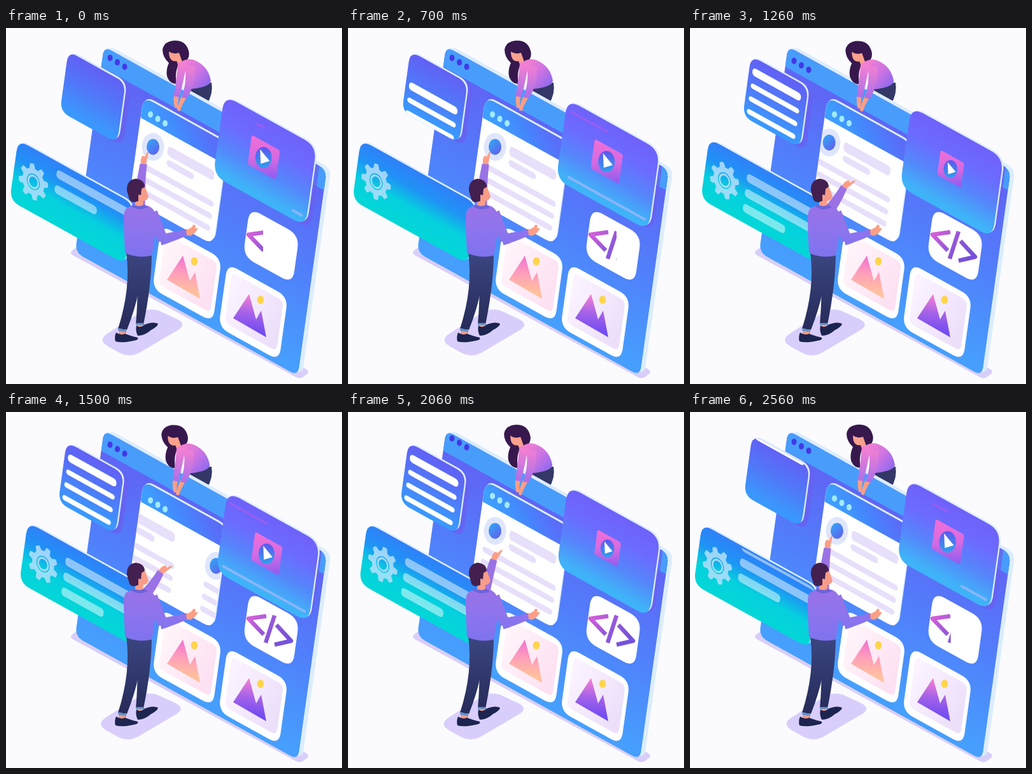
Animation, 528 px wide and 560 px high, one loop 2600 ms. Source, as an HTML page:

```html
<!DOCTYPE html>
<html lang="en">
<head>
<meta charset="utf-8">
<title>Building a web page</title>
<style>
html, body { margin: 0; width: 100%; height: 100%; overflow: hidden; background: #fbfbfe; }
svg { display: block; width: 528px; height: 560px; }
</style>
</head>
<body>
<svg id="stage" viewBox="0 0 528 560" xmlns="http://www.w3.org/2000/svg"></svg>
<script>
const LOOP = 2600, SLOPE = 0.555, LEAN = 0.14, TURN = 2 * Math.PI;
const stage = document.getElementById('stage');
const pair = (x, y) => x.toFixed(1) + ' ' + y.toFixed(1);
const mix = (a, b, k) => a + (b - a) * k;

// Closed polygon with rounded corners
function poly(pts, r) {
  const n = pts.length;
  const toward = (a, b) => {
    const k = r / Math.hypot(b[0] - a[0], b[1] - a[1]);
    return pair(mix(a[0], b[0], k), mix(a[1], b[1], k));
  };
  return pts.map((p, i) =>
    (i ? 'L' : 'M') + toward(p, pts[(i + n - 1) % n]) + 'Q' + p + ' ' + toward(p, pts[(i + 1) % n])
  ).join('') + 'Z';
}
// Rectangle lying in the slanted plane
const slab = (x, y, w, h, r) => poly([
  [x, y], [x + w, y + SLOPE * w], [x + w - LEAN * h, y + SLOPE * w + h], [x - LEAN * h, y + h]], r);

// Tapered limb from a to b, bent toward c, half widths v and w
function limb(a, c, b, v, w) {
  const dx = b[0] - a[0], dy = b[1] - a[1], d = Math.hypot(dx, dy);
  const side = (p, k) => pair(p[0] - dy / d * k, p[1] + dx / d * k);
  const m = (v + w) / 2;
  return `M${side(a, -v)}Q${side(c, -m)} ${side(b, -w)}L${side(b, w)}Q${side(c, m)} ${side(a, v)}Z`;
}

const path = (d, fill, more = '') => `<path d="${d}" fill="${fill}" ${more}/>`;
const at = (dx, dy) => `transform="translate(${dx} ${dy})"`;
const iso = (x, y, sx = 1) => `matrix(${sx} ${SLOPE * sx} ${-LEAN} 1 ${x} ${y})`;
const bar = (x, y, w, h, fill, o = 1) =>
  `<rect width="${w}" height="${h}" rx="${Math.min(h / 2, 5)}" fill="${fill}" opacity="${o}" transform="${iso(x, y)}"/>`;
const repeat = (n, f) => Array.from({ length: n }, (_, i) => f(i)).join('');
const dot = (x, y, rx, ry, fill) => `<ellipse cx="${x}" cy="${y}" rx="${rx}" ry="${ry}" fill="${fill}"/>`;
const dots = (x, y, fill) => repeat(3, i => dot(x + i * 11.5, y + i * 7, 4, 5, fill));

const line = (id, x1, y1, x2, y2, ...cs) =>
  `<linearGradient id="${id}" gradientUnits="userSpaceOnUse" x1="${x1}" y1="${y1}" x2="${x2}" y2="${y2}">` +
  cs.map((c, i) => `<stop offset="${i / (cs.length - 1)}" stop-color="${c}"/>`).join('') + '</linearGradient>';
// Gradient square to the slanted top edge of a card of height h
const fall = (id, x, y, h, ...cs) => line(id, x, y, x - 0.424 * h, y + 0.764 * h, ...cs);
const clip = (id, d, more = '') => `<clipPath id="${id}"><path d="${d}" ${more}/></clipPath>`;

const panel = slab(154, 29, 350, 324, 14);
const win = slab(216, 108, 132, 160, 18);
const note = slab(98, 36, 90, 95, 17);
const menu = slab(19, 176, 182, 95, 18);
const video = slab(343, 105, 145, 126, 22);

const defs = '<defs>' +
  fall('gPanel', 160, 60, 310, '#6064f4', '#5080fb', '#469ffd') +
  line('gHead', 315, 155, 250, 190, '#5a6df8', '#4487fc', '#3e9fff') +
  fall('gNote', 98, 36, 95, '#6260f5', '#5078f8', '#3a98fd') +
  fall('gMenu', 19, 176, 95, '#3080f8', '#1f93f5', '#05d0de', '#04d6d8') +
  fall('gVideo', 343, 105, 126, '#6f61fa', '#6c6bff', '#5586fb', '#3fb3f8') +
  line('gPlay', 0, -32, 0, 32, '#f06fd6', '#d56ae2', '#8b5cf0') +
  line('gDisc', 0, -14, 0, 14, '#5a5cf0', '#2f9fee') +
  line('gCode', 385, 315, 435, 365, '#dc60da', '#9458da', '#7452da') +
  line('gAvatar', 222, 178, 240, 196, '#35a3f6', '#5f62ee') +
  line('gPeakA', 283, 360, 277, 415, '#f173d2', '#ff9fba', '#ffc19c') +
  line('gPeakB', 283, 360, 277, 415, '#f57fd2', '#a763e8', '#744df0') +
  line('gPinkBg', 242, 360, 328, 410, '#fff5fa', '#fde0f2') +
  line('gLilacBg', 242, 360, 328, 410, '#fbf3ff', '#ecdffa') +
  line('gShirt', 275, 55, 318, 92, '#f580d0', '#cf74e2', '#8b69f0') +
  line('gSleeve', 0, 58, 0, 112, '#f380d2', '#a66eea') +
  line('gSweater', 0, 278, 0, 360, '#9a72e6', '#8d74ee', '#7f72ee') +
  line('gTrousers', 0, 355, 0, 478, '#3b4580', '#252a57') +
  clip('cPanel', panel) + clip('cWin', win) + clip('cNote', note) + clip('cMenu', menu, at(0, 3)) +
  '<clipPath id="cCode"><rect id="wipe" x="372" y="300" width="80" height="90"/></clipPath></defs>';

const PAGE = 161;
const page = i => `<g ${at(i * PAGE, i * PAGE * SLOPE)}>` +
  dot(231, 187, 17.5, 22, '#dfe6fb') + dot(231, 187, 10, 12.5, 'url(#gAvatar)') +
  bar(255, 185, 73, 15, '#e8dffa') + bar(253, 206, 43, 10, '#e8dffa') +
  repeat(3, k => bar(212 - k * 2.7, 210 + k * 19, 115, 9, '#e8dffa')) + '</g>';

const picture = (dx, dy, bg, peak) => `<g ${at(dx, dy)}>` +
  path(slab(244, 310, 95, 100, 18), '#fff') + path(slab(251, 324, 81, 79, 9), `url(#${bg})`) +
  path('M253 396L278 358 289 398 297 384 305 426Z', `url(#${peak})`) + dot(296, 367, 5.3, 6.5, '#ffd54a') + '</g>';

// Eight teeth: the radius swings between two flattened levels
function gear() {
  const rim = repeat(96, i => {
    const a = i / 96 * TURN, wave = Math.max(-1, Math.min(1, 2.2 * Math.cos(8 * a)));
    const r = 23.3 + 3.4 * wave;
    return (i ? 'L' : 'M') + pair(r * Math.cos(a), r * Math.sin(a));
  });
  return path(rim + 'ZM12 0A12 12 0 1 0-12 0 12 12 0 1 0 12 0Z', '#b4e0fb', 'fill-rule="evenodd" opacity=".85"') +
    '<circle r="9" fill="none" stroke="#a5daf9" stroke-width="3"/>';
}

const skin = '#fb9e86', rim = '#dcedfd', shade = '#6a5ff0', shoe = '#1c2450';
const card = (d, fill) => path(d, rim, at(2.5, -1.5)) + path(d, `url(#${fill})`);

const woman =
  path('M262 20Q282 18 287 36 290 48 280 54L270 60Q265 72 268 88 257 88 253 76 251 66 256 55 246 46 246 34 248 22 262 20Z', '#37184d') +
  path('M256 37Q263 42 272 39L278 56 270 57 268 52Q256 54 256 37Z', '#f9a18d') +
  path('M271 56Q285 45 297 51 318 60 322 83 321 93 290 96L285 68Z', 'url(#gShirt)') +
  path(limb([268, 106], [266, 116], [268, 126], 4, 2.5), skin) + path(limb([280, 108], [274, 118], [271, 130], 4, 2.5), skin) +
  path(limb([277, 55], [274, 80], [268, 108], 7, 4.5), 'url(#gSleeve)') +
  path(limb([289, 60], [291, 88], [280, 110], 8, 4.5), 'url(#gSleeve)');

const man =
  path(limb([201, 356], [206, 410], [183, 474], 12, 7), 'url(#gTrousers)') +
  path(limb([216, 356], [219, 405], [210, 466], 13, 6), 'url(#gTrousers)') +
  path('M177 474H189V482H177ZM205 465H215V472H205Z', '#f29a85') +
  path('M177 472L189 475 189 478 176 476ZM204 464H217V467H204Z', '#5f8fca') +
  path('M173 479Q180 484 187 481 198 485 207 487 209 491 200 492 182 496 172 493 170 486 173 479Z', shoe) +
  path('M205 468Q212 473 217 467 230 461 239 465 238 470 228 475 218 484 207 484 203 476 205 468Z', shoe) +
  path('M189 284Q205 274 224 280 238 286 237 310L229 358Q208 363 187 354 185 320 185 296 186 287 189 284Z', 'url(#gSweater)') +
  path(limb([230, 290], [238, 312], [247, 334], 8, 8), 'url(#gSweater)') +
  path(limb([242, 333], [262, 329], [285, 321], 9, 5), 'url(#gSweater)') +
  path('M283 318L291 314 295 309 298 311 297 315 302 315 297 322 290 327 284 326Z', skin) +
  path('M203 258L213 250 219 251 224 265Q222 272 216 272L215 281 203 279Z', '#f79c88') +
  path('M199 277Q207 283 217 278L223 282Q210 289 197 281Z', '#6e63d8') +
  path('M190 256Q189 239 204 237 218 239 218 250L213 253 212 263 208 262 208 272Q198 277 194 270Z', '#43204f');

stage.innerHTML = defs +
  '<rect width="528" height="560" fill="#fbfbfe"/>' +
  path(poly([[99, 354], [114, 342], [478, 540], [462, 553]], 7), '#d9cefa') +
  path(poly([[143, 491], [226, 438], [286, 466], [194, 520]], 20), '#d9cefb', 'id="ground"') +
  path('M286 94Q305 86 323 86 326 102 316 120L288 104Z', '#333866') +
  path(panel, rim, at(7, -2)) + path(panel, rim, at(2, -2)) + path(panel, 'url(#gPanel)') +
  '<g clip-path="url(#cPanel)">' + path(slab(154, 29, 360, 32, 0), '#489dfb') +
  path(note, shade, 'id="noteShade" opacity=".75"') + path(video, shade, 'id="videoShade" opacity=".75"') + '</g>' +
  `<g id="dotsA">${dots(163.5, 47, '#4338e6')}</g>` +
  path(win, rim, at(2, -2)) + path(win, '#fff') +
  `<g clip-path="url(#cWin)"><g id="pages">${page(0)}${page(1)}</g>` +
  path(slab(216, 108, 132, 33, 0), 'url(#gHead)') + '</g>' +
  `<g id="dotsB">${dots(227, 136, '#a2eafc')}</g>` +
  picture(0, 0, 'gPinkBg', 'gPeakA') + picture(104, 60.5, 'gLilacBg', 'gPeakB') +
  path(slab(383, 283, 78, 76, 20), '#fff') +
  '<g clip-path="url(#cCode)" fill="none" stroke="url(#gCode)" stroke-width="6.5" stroke-linejoin="round">' +
  '<path d="M409 321L381 325 405 350M422 320L408 363M425 335L448 360 422 366"/></g>' +
  '<g id="video">' + card(video, 'gVideo') +
  '<path id="trackA" fill="none" stroke="#a55cf0" stroke-width="3.5" opacity=".75"/>' +
  '<path id="trackB" fill="none" stroke="#a9b8fb" stroke-width="4" opacity=".7"/>' +
  '<g id="play">' + path(slab(-18, -34, 41, 43, 3), 'url(#gPlay)') +
  dot(-1, -1, 12, 15.5, 'url(#gDisc)') + path('M-6 -13L8 4 -5 8Z', '#fff') + '</g></g>' +
  '<g id="note">' + card(note, 'gNote') + '<g clip-path="url(#cNote)"><g id="noteBars">' +
  bar(101, 54, 76, 12, '#fff') + repeat(3, i => bar(98 - i * 3, 78 + i * 20, 76, 8, '#fff')) + '</g></g></g>' +
  '<g id="menu">' + card(menu, 'gMenu') +
  `<g transform="${iso(43, 242, .85)}"><g id="gear">${gear()}</g></g>` +
  '<g clip-path="url(#cMenu)"><g id="menuBars">' +
  repeat(3, i => bar(79 - i * 3, 230 + i * 23.5, i < 2 ? 118 : 66, 13, '#fff', .48)) + '</g></g></g>' +
  `<g id="woman">${woman}</g>` +
  '<g id="hand">' + path('M-4 2L-5 -7 -3 -13 1 -12 4 -20 6 -19 5 -9 4 2Z', skin) + '</g>' +
  '<path id="arm" fill="#9a72e6"/>' + man;

const el = {};
stage.querySelectorAll('[id]').forEach(e => { el[e.id] = e; });

const part = (t, a, b) => Math.min(1, Math.max(0, (t - a) / (b - a)));
const ease = (t, a, b) => { const p = part(t, a, b); return p * p * (3 - 2 * p); };
const bob = (t, from, span, amp) => amp * Math.sin(TURN * part(t, from, from + span));
const move = (e, x, y, more = '') => e.setAttribute('transform', `translate(${x.toFixed(2)} ${y.toFixed(2)}) ${more}`);

// Scroll along the card: in from below, out through the top across the loop's seam
function scroll(e, t, inFrom, inTo, below, outFrom, outTo, above) {
  const q = 1 - part(t, inFrom, inTo);
  const y = t < inFrom ? -above * ease(t + LOOP, outFrom, outTo)
    : below * q * q - above * ease(t, outFrom, outTo);
  move(e, -LEAN * y, y);
}

function track(e, x, y, len, a, b) {
  const p = k => pair(x + len * k, y + len * k * SLOPE);
  e.setAttribute('d', b - a > .02 ? `M${p(a)}L${p(b)}` : '');
}

function draw(t) {
  const reach = ease(t, 680, 1340) - ease(t, 1640, 2460);
  const wrist = [216 + 27 * reach, 214 + 38 * reach];
  el.arm.setAttribute('d', limb([210 + 6 * reach, 290], [210 + 21 * reach, 250 + 24 * reach], wrist, 9, 5.5));
  move(el.hand, ...wrist, `rotate(${mix(6, 48, reach).toFixed(1)})`);
  move(el.woman, -1.8 * reach, .6 * reach);
  move(el.ground, -2.5 * reach, 0);

  const slide = -PAGE * ease(t, 1100, 2050);
  move(el.pages, slide, slide * SLOPE);
  move(el.dotsA, 0, bob(t, 1050, 1300, 5.5));
  move(el.dotsB, 0, bob(t, 1400, 1050, 5.3));

  const nk = ease(t, 600, 1700) - ease(t, 1980, 2600);
  move(el.note, -3 * nk, 12 * nk);
  move(el.noteShade, 9 - 3 * nk, 5 + 12 * nk);
  scroll(el.noteBars, t, 450, 1000, 100, 2080, 2640, 88);

  const mk = ease(t, 500, 1750) - ease(t, 1750, 2580);
  move(el.menu, 17 * mk, -3 * mk);
  el.gear.setAttribute('transform', `rotate(${(360 * t / LOOP + 30).toFixed(2)})`);
  scroll(el.menuBars, t, 700, 1150, 80, 2300, 3000, 80);

  const vk = (1 + Math.cos(TURN * (t - 1470) / LOOP)) / 2;
  move(el.video, 5 * vk, 20 * vk);
  move(el.videoShade, 8 + 3 * vk, 5 + 10 * vk);
  const beat = t * 3 / LOOP % 1, ph = beat < .2 ? beat + 1 : beat;
  const grow = ease(ph, .43, .74);
  track(el.trackA, 346, 123, 60, ease(ph, .77, 1.1), grow);
  track(el.trackB, 335, 222, 131, ease(ph, .76, 1.07), grow);
  const pulse = 1 + .1 * Math.cos(TURN * (beat - .9));
  move(el.play, 405.5, 204, `scale(${pulse.toFixed(3)})`);

  const shown = t < 370 ? 1 - ease(t + LOOP, 2130, 2960) : ease(t, 380, 930) - ease(t, 2130, 2960);
  el.wipe.setAttribute('width', (80 * Math.max(0, shown)).toFixed(1));
}

function tick() {
  draw(performance.now() % LOOP);
  requestAnimationFrame(tick);
}
tick();
</script>
</body>
</html>
```
